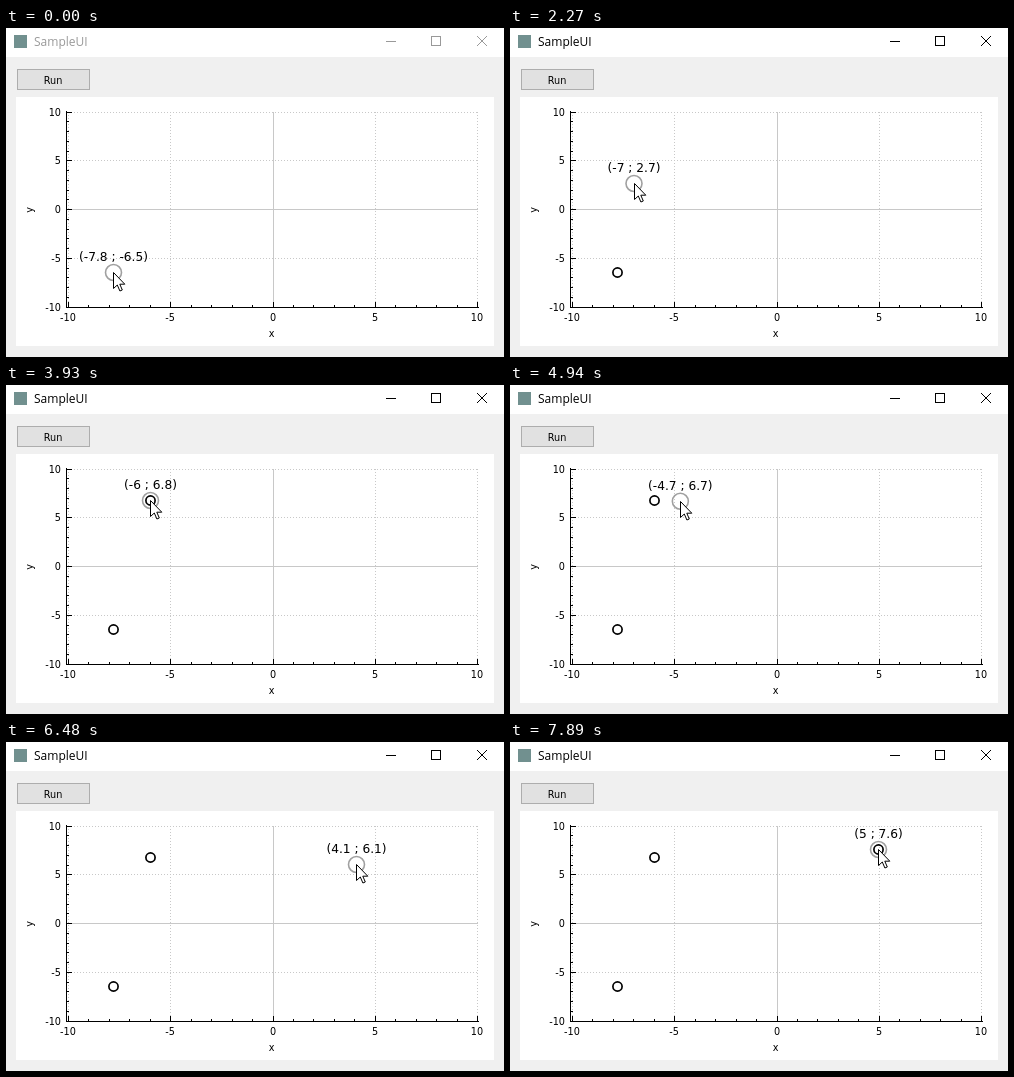
Write an HTML page that moves like this. It is 498 px wide and 329 px high and loops after 8 s.

```html
<!DOCTYPE html>
<html lang="en">
<head>
<meta charset="utf-8">
<title>SampleUI</title>
<style>
  html, body { margin: 0; width: 100%; height: 100%; overflow: hidden; background: #f0f0f0; }
  svg { display: block; width: 498px; height: 329px; }
  text { font-family: "DejaVu Sans", sans-serif; font-size: 9.7px; }
  .title { font-family: "Open Sans", sans-serif; font-size: 12px; }
  .readout { font-size: 12.2px; text-anchor: middle; }
  .middle { text-anchor: middle; }
  .end { text-anchor: end; }
  .crisp { shape-rendering: crispEdges; }
  .grid { stroke: #c8c8c8; }
  .dotted { stroke-dasharray: 1 2; }
  .axis { stroke: #000; }
  .point { fill: none; stroke: #000; stroke-width: 1.7; }
</style>
</head>
<body>
<svg viewBox="0 0 498 329">
  <rect width="498" height="329" fill="#f0f0f0"/>
  <rect width="498" height="29" fill="#fff"/>
  <rect x="8" y="7" width="13" height="13" fill="#71908f"/>
  <text id="title" class="title" x="28" y="18">SampleUI</text>
  <g id="buttons" fill="none">
    <path class="crisp" d="M380 13.5h10M425.5 8.5h9v9h-9z"/>
    <path d="M471 8l10 10M481 8l-10 10"/>
  </g>
  <rect class="crisp" x="11.5" y="41.5" width="72" height="20" fill="#e1e1e1" stroke="#adadad"/>
  <text class="middle" x="47" y="56">Run</text>
  <rect x="10" y="69" width="478" height="249" fill="#fff"/>
  <g id="chart"></g>
  <text class="middle" x="265.5" y="309">x</text>
  <text class="middle" transform="translate(27 182) rotate(-90)">y</text>
  <circle id="ring" r="8" fill="none" stroke="#a0a0a0" stroke-width="1.6"/>
  <g id="points"></g>
  <text id="readout" class="readout"></text>
  <path id="cursor" d="M0 0V16L3.8 12.5L6.4 18.5L8.8 17.5L6.3 11.7H11.3Z" fill="#fff" stroke="#000"/>
</svg>
<script>
const DURATION = 8000;
const FRAME = 140;
const ACTIVATE = 500;
const CLICKS = [ACTIVATE, 3930, 7890];
const ORIGIN = { x: 267, y: 181.5 };
const UNIT = { x: 20.45, y: 9.75 };

// Each stroke of the mouse: first and last update, then where it ends
const strokes = [
  [0, 0, 107.5, 244.5],
  [1690, 1690, 107.5, 242.5],
  [1840, 2270, 124, 155.5],
  [2730, 3010, 134.5, 129.5],
  [3160, 3470, 144.5, 115.5],
  [4820, 5200, 228.5, 118],
  [5660, 5660, 233.5, 118.5],
  [5780, 5910, 312.5, 118.5],
  [6060, 6060, 326.5, 117.5],
  [6340, 6340, 330.5, 118.5],
  [6480, 6480, 350.5, 122.5],
  [6630, 6760, 357.5, 116.5],
  [6910, 6910, 363.5, 107.5],
  [7190, 7610, 368.5, 107.5]
];

const $ = id => document.getElementById(id);

function add(parent, name, attrs, content = "") {
  const node = document.createElementNS("http://www.w3.org/2000/svg", name);
  for (const key in attrs) node.setAttribute(key, attrs[key]);
  node.textContent = content;
  return parent.appendChild(node);
}

const snap = v => Math.floor(v) + 0.5;
const px = v => snap(ORIGIN.x + UNIT.x * v);
const py = v => snap(ORIGIN.y - UNIT.y * v);
const format = v => String(Number(v.toFixed(1)) || 0);
const mix = (a, b, u) => a + (b - a) * u;

function drawChart() {
  const chart = $("chart");
  const line = (d, kind) => add(chart, "path", { d, class: "crisp " + kind, fill: "none" });
  for (let v = -10; v <= 10; v += 5) {
    const kind = v ? "grid dotted" : "grid";
    line(`M${px(v)} 280V84`, kind);
    line(`M62 ${py(v)}H472`, kind);
    add(chart, "text", { class: "middle", x: px(v) - 0.5, y: 293 }, v);
    add(chart, "text", { class: "end", x: 55, y: py(v) + 3.5 }, v);
  }
  line("M60.5 83V280M60 279.5H473", "axis");
  for (let v = -10; v <= 10; v++) {
    const size = v % 5 ? 2 : 5;
    line(`M${px(v)} 279v${-size}M61 ${py(v)}h${size}`, "axis");
  }
}

// The hover ring moves in discrete, slightly decelerating updates
function hover(time) {
  const i = strokes.findLastIndex(stroke => stroke[0] <= time);
  const [first, last, x, y] = strokes[i];
  const [, , fromX, fromY] = strokes[Math.max(i - 1, 0)];
  const gaps = Math.round((last - first) / FRAME);
  const step = gaps && Math.min(gaps, Math.floor((time - first) / (last - first) * gaps + 1e-6));
  const u = ((step + 1) / (gaps + 1)) ** 0.85;
  return { x: mix(fromX, x, u), y: mix(fromY, y, u) };
}

const marks = CLICKS.map(time => {
  const { x, y } = hover(time);
  return { time, node: add($("points"), "circle", { class: "point", cx: x, cy: y, r: 4.6 }) };
});

function place(id, x, y) {
  $(id).setAttribute("transform", `translate(${x} ${y})`);
}

function render(time) {
  const { x, y } = hover(time);
  const ink = time >= ACTIVATE ? "#000" : "#999";
  $("title").setAttribute("fill", ink);
  $("buttons").setAttribute("stroke", ink);
  place("ring", x, y);
  // The pointer runs a little ahead of the ring
  const lead = Math.round((hover(time + 150).y - y) * 0.1);
  place("cursor", snap(x), snap(y) + lead);
  place("readout", x, y - 11.5);
  $("readout").textContent =
    `(${format((x - ORIGIN.x) / UNIT.x)} ; ${format((ORIGIN.y - y) / UNIT.y)})`;
  for (const mark of marks) mark.node.setAttribute("visibility", time >= mark.time ? "visible" : "hidden");
}

drawChart();
const start = performance.now();
function tick() {
  render((performance.now() - start) % DURATION);
  requestAnimationFrame(tick);
}
tick();
</script>
</body>
</html>
```
